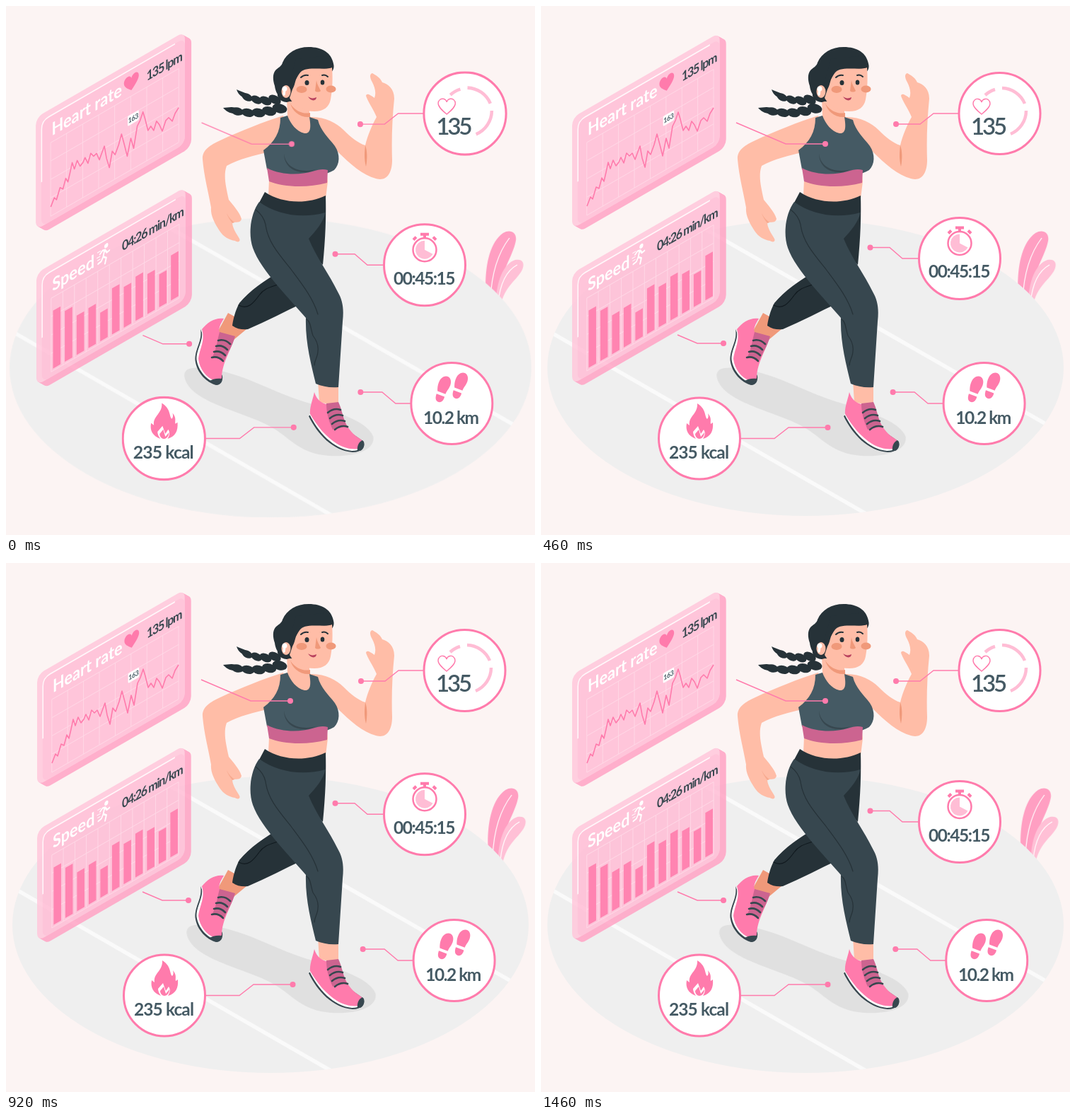
An HTML page for the animation above (1500 ms loop, 748 px wide and 748 px high).

```html
<!DOCTYPE html>
<html lang="en">
<head>
<meta charset="utf-8">
<title>Running stats</title>
<style>
html, body { margin: 0; width: 100%; height: 100%; overflow: hidden; background: #fcf4f3; }
svg { display: block; width: 100vw; height: 100vh; }
text { font-family: Lato, "Open Sans", sans-serif; font-weight: 700; fill: #455a64; }
.num { font-size: 24.5px; text-anchor: middle; letter-spacing: -1.5px; }
.title { font-size: 25px; fill: #fff; }
.value { font-size: 18.5px; letter-spacing: -1.5px; fill: #37474f; }
.line { fill: none; stroke: #ff7bac; stroke-width: 1.4; }
.ring { fill: #fff; stroke: #ff7bac; stroke-width: 3; }
.pink { fill: #ff7bac; }
.skin { fill: #ffbda7; }
.tan { fill: #f0997a; }
.dark { fill: #263238; }
.thin { fill: none; stroke: #263238; stroke-width: 1.2; stroke-linecap: round; }
.lace { fill: none; stroke: #37474f; stroke-width: 2.6; stroke-linecap: round; }
.grid { fill: none; stroke: #fff; stroke-width: 1; opacity: .35; }

.beat, .float, .shake { animation: beat 1.5s linear -15ms infinite; }
.float { animation-name: float; }
.shake { animation-name: shake; }
@keyframes beat {
  0%, 30%, 40%, 60%, 100% { transform: scale(1); }
  10%, 50% { transform: scale(1.1); }
}
@keyframes float {
  0%, 100% { transform: translateY(0); }
  50% { transform: translateY(-15px); }
}
@keyframes shake {
  0%, 100% { transform: translateX(0); }
  10%, 90% { transform: translateX(-1.5px); }
  20%, 80% { transform: translateX(3px); }
  30%, 50%, 70% { transform: translateX(-6px); }
  40%, 60% { transform: translateX(6px); }
}
</style>
</head>
<body>
<svg viewBox="0 0 748 748">
  <defs>
    <clipPath id="field"><ellipse cx="374" cy="511.5" rx="365" ry="209.5"/></clipPath>
    <path id="heart" d="M0 11C-6 6-12 1-12-4C-12-9-8-11-5-10.5C-2-10-.5-8 0-6C.5-8 2-10 5-10.5C8-11 12-9 12-4C12 1 6 6 0 11Z"/>
    <g id="foot">
      <path d="M-6 6C-9-1-10-11-5-16C0-21 7-18 8-10C9-4 6 1 6 6Z"/>
      <path d="M-6 10H6C7 16 4 20 0 20C-4 20-6 16-6 10Z"/>
    </g>
  </defs>

  <g class="shake">
    <path fill="#ff9fc2" d="M680 425C675 382 680 337 703 321C713 315 723 320 721 332C717 354 699 374 694 420Z"/>
    <path fill="#ffc0d6" d="M693 425C692 390 704 364 720 359C731 357 734 364 730 373C722 389 706 394 699 425Z"/>
    <path fill="none" stroke="#fff" stroke-width="1.2" d="M712 328C699 345 687 370 685 415M723 366C710 373 699 389 696 420"/>
  </g>

  <g class="beat" style="transform-origin:374px 511.5px">
    <ellipse cx="374" cy="511.5" rx="365" ry="209.5" fill="#efefef"/>
    <path clip-path="url(#field)" stroke="#fafafa" stroke-width="5.5" d="M0 453.5L490 735.5M200 297L740 606"/>
  </g>

  <path class="shake" fill="#e0e0e0" d="M252.5 525C250 510 268 510 287 513C333 519 372 543 414 557C458 571 511 585 519.5 609C523 632 480 641 442 634C408 626 398 607 371 593C331 572 260 560 252.5 525Z"/>

  <g id="runner">
    <!-- back leg -->
    <path class="tan" d="M314 434L299 461L322 472L346 452Z"/>
    <path class="dark" d="M386 376C366 388 345 402 330 420C324 431 321 444 320 452C327 457 335 458 342 457C368 446 394 432 420 420L430 400Z"/>
    <path class="thin" style="stroke:#111a1f" d="M329 423C342 430 350 420 358 409C364 400 372 398 384 394"/>
    <path fill="#37474f" d="M275 457C278 474 267 484 267.5 501C270 520 284 532 297 536C304 536 307 530 306 523L285 480Z"/>
    <path fill="#fff" d="M276.5 458C280 474 269 484 269.5 500C272 517 285 529 296 533L302 520Z"/>
    <path class="pink" d="M277 457C285 447 296 440 308 442C303 450 299 458 303 463L323 468C318 488 306 503 305 525C304 531 300 532 295 530C283 525 274 514 272 499C274 484 282 473 277 457Z"/>
    <path fill="#cc6490" d="M302 461L324 467C320 482 313 490 309 501L292 496C298 484 299 471 302 461Z"/>
    <path class="lace" d="M300 473C307 471 313 474 317 478M297 481C304 479 309 482 313 486M294 489C301 487 306 490 310 494M291 497C298 495 303 498 307 502"/>
    <path fill="#37474f" d="M286 531C292 527 299 526 305 527C305 533 301 536 297 535.5Z"/>

    <!-- right arm -->
    <path class="skin" d="M430 157C450 156 467 165 477 175C488 186 498 194 508 197C512 181 518 168 524 157C519 145 511 134 509 127C510 123 514 125 521 130C524 122 521 114 518 108C514 101 514 96 518 95C523 98 529 101 532 108C540 110 549 117 549 131C546 160 545 190 546 218C546 234 540 245 529 245C509 243 488 225 469 206L440 200Z"/>
    <path class="tan" d="M508 197C511 205 511 216 509 227C506 216 507 206 508 197Z"/>

    <!-- left arm -->
    <path class="skin" d="M392 155C364 164 333 176 303 190C288 197 277 204 278 217C280 241 286 262 290 285C289 296 295 307 302 318C307 326 316 331 324 332C328 335 332 333 330 329C326 322 321 316 320 307C326 304 331 308 333 301C330 291 322 283 315 274C311 255 307 240 312 226C330 216 350 212 372 206L400 190Z"/>
    <path class="tan" opacity=".55" d="M320 307C317 303 314 299 312 293C315 299 319 303 323 306Z"/>

    <!-- torso -->
    <path class="skin" d="M397 130L398 155L388 162L372 246L371 268C396 279 428 280 452 272L455 248L444 163L429 156V145Z"/>
    <path class="tan" d="M402 138C410 150 421 153 430 151V157C414 158 405 148 402 138Z"/>
    <path fill="#455a64" d="M388 158L398 155C402 166 411 178 422 180C432 181 431 169 429 157L441 161C445 177 456 186 465 198C473 210 472 224 464 232C440 246 395 243 369 231L364 204C380 192 388 178 388 158Z"/>
    <path fill="#cc6490" d="M369 229C390 240 416 239 433 234C443 231 448 230 455 232L454 250C425 258 392 256 372 248Z"/>
    <path fill="#37474f" d="M393 209C393 221 401 234 420 235C428 236 435 232 441 230C422 237 396 232 393 209Z"/>

    <!-- front leg -->
    <path class="skin" d="M441 530H470V566L443 560Z"/>
    <path class="dark" d="M366 263C390 279 425 281 452 268C453 304 451 335 448 366L420 340L357 280Z"/>
    <path fill="#37474f" d="M358 277C384 296 420 301 451.5 292C449 306 437 319 428 329C438 354 458 381 469 404C476 416 478 428 476 446L470 539C458 540 447 538 438 534C431 505 423 475 424 441C404 417 360 374 349 342C342 322 346 293 358 277Z"/>
    <path class="thin" d="M353 288C361 294 365 300 367 309C370 333 385 350 402 371C416 390 434 412 441 436M425 443C431 446 431 458 434 466C440 474 442 481 441 488C441 496 436 501 436 508"/>
    <path fill="#37474f" d="M428 580C440 605 462 629 490 631C503 631 508 624 506 616L440 570Z"/>
    <path fill="#fff" d="M429 577C441 602 463 627 489 629C500 629 505 624 504 618L440 570Z"/>
    <path class="pink" d="M436 546C440 560 453 568 470 561C476 578 479 596 496 609C503 613 508 617 505 623C498 629 481 627 468 619C452 609 440 594 430 577C429 567 434 556 436 546Z"/>
    <path fill="#cc6490" d="M453 562L470 560C475 570 476 582 482 594L462 599C456 586 453 575 453 562Z"/>
    <path class="lace" d="M455 575C461 570 467 569 473 571M458 583C464 578 470 577 476 579M461 591C467 586 473 585 479 587M465 599C471 594 477 593 483 595"/>
    <path fill="#37474f" d="M497 629C496 622 499 616 504 614C508 618 507 626 501 629Z"/>

    <!-- head -->
    <g id="braids" class="dark"></g>
    <path class="dark" d="M380 113C377 104 377 96 381 91C385 87 390 85 391 80C397 66 411 58 428 58C447 58 461 66 463.5 84C464 90 461 94 456 95L415 135H395C384 128 381 121 380 113Z"/>
    <path class="skin" d="M405 118C410 110 409 98 417 92C430 82 446 92 461 87C462 100 462 116 459 132C457 143 449 149 436 149C420 149 407 141 401 130Z"/>
    <path class="dark" d="M400 110C408 112 411 100 416 94C425 85 441 91 461 87L458 70L410 75Z"/>
    <ellipse class="skin" cx="396" cy="121" rx="6.5" ry="9"/>
    <path fill="none" stroke="#fff" stroke-width="3.5" stroke-linecap="round" d="M394 117L393 125"/>
    <circle cx="394" cy="117" r="3.5" fill="#fff"/>
    <ellipse class="tan" cx="418" cy="118" rx="7.5" ry="5"/>
    <ellipse class="tan" cx="459.5" cy="117.5" rx="7" ry="5"/>
    <ellipse class="dark" cx="425.5" cy="108.5" rx="3" ry="3.6"/>
    <ellipse class="dark" cx="447.5" cy="108" rx="2.8" ry="3.6"/>
    <path class="thin" style="stroke-width:2" d="M417 101C420 98 423 97 427 98M447 98C450 97 453 98 455 100"/>
    <path class="tan" d="M439 105C440 112 444 117 445 120C443 122 439 122 437 120Z"/>
    <path fill="#b9425f" d="M427 128C431 131 435 131 439 129C439 134 432 136 427 128Z"/>
  </g>

  <g class="beat" style="transform-origin:225px 179.5px">
    <g id="pulse"></g>
    <path class="line" d="M276 165L346 195H402"/>
    <circle class="pink" cx="402" cy="195" r="4"/>
  </g>

  <g class="beat" style="transform-origin:153px 399.5px">
    <g id="speed"></g>
    <path class="line" d="M193 465L221 477H258"/>
    <circle class="pink" cx="258" cy="477" r="4"/>
  </g>

  <g class="beat" style="transform-origin:602px 152px">
    <path class="line" d="M502 167H536L555 152H591"/>
    <circle class="pink" cx="502" cy="167" r="4"/>
    <circle class="ring" cx="648.5" cy="152" r="57.5"/>
    <path fill="none" stroke="#ffbdd5" stroke-width="4.5" d="M652 116A36 36 0 0 1 684 138M686 148A36 36 0 0 1 664 181M628 126A36 36 0 0 1 642 118"/>
    <use href="#heart" x="623" y="142" fill="#fff" stroke="#ff7bac" stroke-width="1.4"/>
    <text x="632" y="182" style="font-size:33px;font-weight:600;letter-spacing:-3.2px;text-anchor:middle">135</text>
  </g>

  <g class="beat" style="transform-origin:288px 611.5px">
    <path class="line" d="M282 611.5H330L350 596H405.5"/>
    <circle class="pink" cx="405.5" cy="596" r="4"/>
    <circle class="ring" cx="224" cy="611.5" r="57.5"/>
    <path class="pink" d="M221 562C234 570 231 580 235 584C237 582 237 579 236 576C242 583 239 587 240 591L243 589C244 601 240 609 229 612C233 606 232 602 230 599L226 605L222 594L215 602C215 606 217 609 219 612C208 608 204 600 206 590L210 593C208 580 222 577 221 562Z"/>
    <path class="pink" d="M218 605L223 599L226 609L231 603C231 609 227 612 224 612C221 612 218 609 218 605Z"/>
    <text class="num" x="223" y="640" style="letter-spacing:-.9px">235 kcal</text>
  </g>

  <g class="float">
    <path class="line" d="M465.5 351H493L511 366.5H534"/>
    <circle class="pink" cx="465.5" cy="351" r="4"/>
    <circle class="ring" cx="592" cy="366.5" r="57.5"/>
    <circle cx="592" cy="345" r="16.5" fill="#fff" stroke="#ff7bac" stroke-width="2.5"/>
    <path fill="#ffbdd5" d="M592 345L603.5 351A13 13 0 1 1 592 332Z"/>
    <path fill="none" stroke="#ff7bac" stroke-width="4" d="M586 323H598M592 324V329M576 331L580 327M604 327L608 331"/>
    <text class="num" x="591" y="394">00:45:15</text>
  </g>

  <g class="shake">
    <path class="line" d="M501.5 546H532L551 562H573"/>
    <circle class="pink" cx="501.5" cy="546" r="4"/>
    <circle class="ring" cx="630.5" cy="562" r="57.5"/>
    <use href="#foot" class="pink" transform="translate(618 541) rotate(20)"/>
    <use href="#foot" class="pink" transform="translate(642 536) rotate(20)"/>
    <text class="num" x="629" y="590.5">10.2 km</text>
  </g>
</svg>

<script>
const $ = id => document.getElementById(id);
const iso = (y, body) => `<g transform="matrix(.866 -.5 0 1 44 ${y})">${body}</g>`;
const rect = (x, y, w, h, fill, r = 0) =>
  `<rect x="${x}" y="${y}" width="${w}" height="${h}" rx="${r}" fill="${fill}"/>`;
const label = (x, cls, str) => `<text class="${cls}" x="${x}" y="38.5">${str}</text>`;

// Glass slab: extruded back, front face and top-left highlight
function slab(y) {
  let s = "";
  for (let k = 9; k > 0; k--)
    s += `<g transform="translate(${k} ${k * 5 / 9})">${iso(y, rect(0, 0, 241, 157, "#ffa6c6", 11))}</g>`;
  s += iso(y, rect(0, 0, 241, 157, "#ffc9dc", 11) + rect(9, 9, 232, 148, "#ffbfd6", 10));
  return `<g opacity=".88">${s}</g>` +
    iso(y, `<path fill="none" stroke="#fff" stroke-width="1.8" opacity=".85" d="M9.5 95V21Q9.5 9.5 21 9.5H225"/>`);
}

function grid(x, w, cols, rows) {
  let d = "";
  for (let i = 0; i <= cols; i++) d += `M${x + w * i / cols} 47V150`;
  for (let i = 0; i <= rows; i++) d += `M${x} ${47 + 103 * i / rows}h${w}`;
  return `<path class="grid" d="${d}"/>`;
}

const wave = `65 283 70 270 73 273 78 256 82 258 86 243 89 248 92 235 95 221 98 230 102 218
  106 226 110 221 113 214 117 222 121 208 125 212 129 208 133 217 137 206 140 198 143 215
  147 228 151 205 155 210 160 196 164 181 168 196 172 212 177 187 181 201 186 170 190 162
  194 150 197 160 201 176 205 170 209 176 213 163 217 168 221 177 226 162 230 158 235 163
  239 152 244 144`;

$("pulse").innerHTML = slab(158) +
  iso(158, grid(24, 207, 8, 4) + label(25.5, "title", "Heart rate") + label(179, "value", "135 lpm") +
    `<use href="#heart" class="pink" x="154.5" y="28"/>`) +
  `<polyline points="${wave}" fill="none" stroke="#ff7bac" stroke-width="1.6" stroke-linejoin="round"/>` +
  iso(158, rect(148.5, 72.5, 18, 14, "#fff", 2) +
    `<text x="157.5" y="83" style="font-size:10px;text-anchor:middle;letter-spacing:-.3px">163</text>`);

const bars = [81, 71, 55, 56, 40, 64.5, 57, 62, 56, 46, 63]
  .map((h, i) => rect(27 + i * 19.05, 147 - h, 12.2, h, "#ff84b1")).join("");
const sprinter = `<g transform="translate(109 28)" fill="none" stroke="#fff" stroke-width="2.4" stroke-linecap="round" stroke-linejoin="round">
  <circle cx="4" cy="-10" r="2" fill="#fff"/>
  <path d="M-6-3L-2-6L2-5L5 0L9-1M1-4L-1 3L4 7L2 14M-1 3L-4 8L-9 9"/>
  <path stroke-width="1.2" d="M-10-7h5M-11 0h5M-10 4h4"/></g>`;

$("speed").innerHTML = slab(378) +
  iso(378, grid(24, 207, 11, 4) + bars + label(25.5, "title", "Speed") + sprinter +
    label(138.5, "value", "04:26 min/km"));

// Two braids of overlapping tufts with tapered tips
const tuft = (x, y, r, a) =>
  `<ellipse cx="${x}" cy="${y}" rx="${r}" ry="${r * .62}" transform="rotate(${a} ${x} ${y})"/>`;
let tufts = `<path d="M326 118C333 122 340 121 346 130C336 132 329 127 326 118ZM307 144C315 144 321 140 331 148C324 155 314 152 307 144Z"/>`;
for (let i = 0; i < 5; i++) {
  const sag = Math.sin(i * .8);
  tufts += tuft(341 + i * 13, 129 + 5 * sag, 8 + i * .5, 28);
  tufts += tuft(327 + i * 15, 149 + 4 * sag - i, 9 + i * .4, 14);
}
$("braids").innerHTML = tufts;
</script>
</body>
</html>
```
